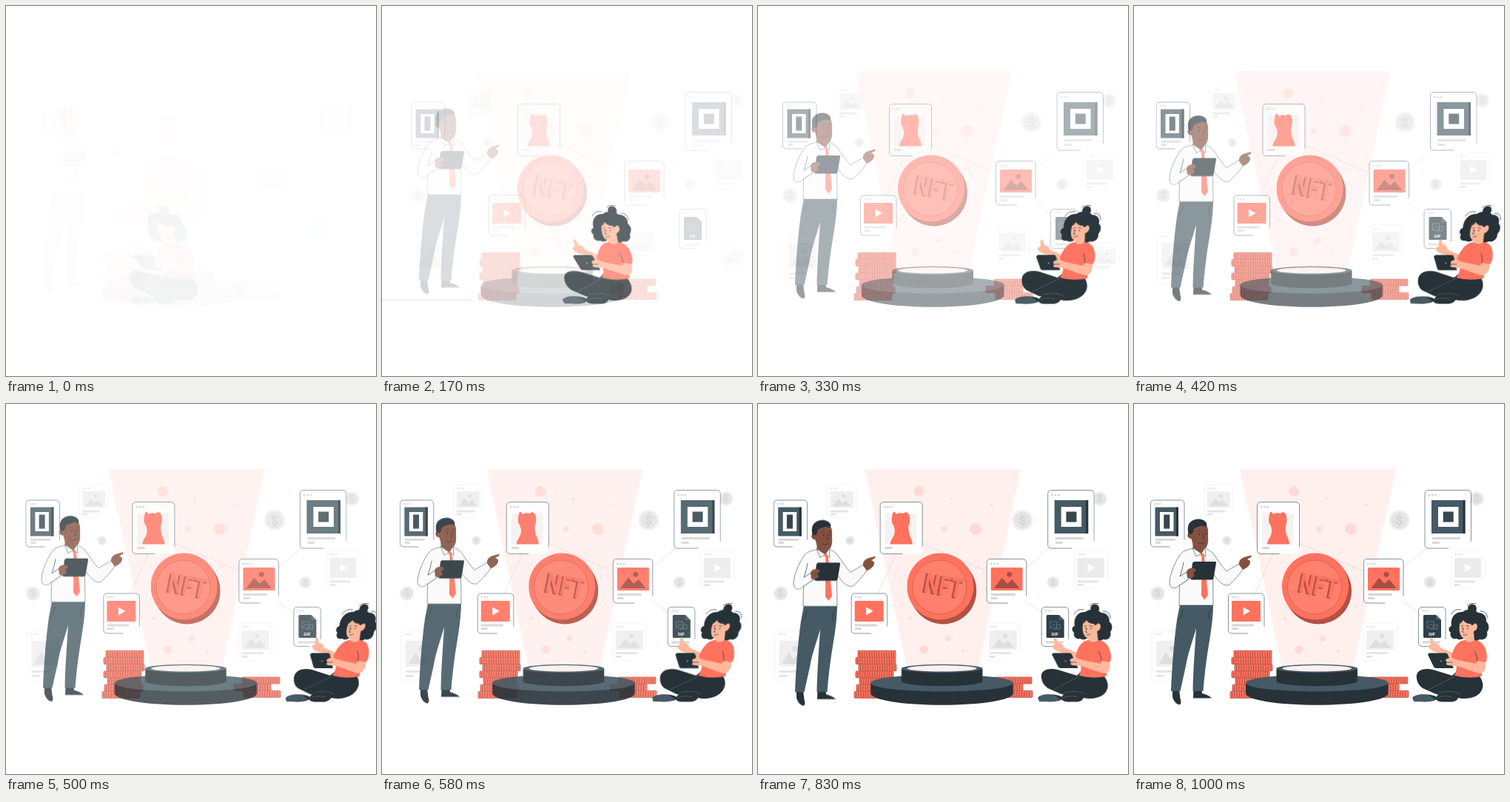
An HTML page that plays this animation: 500x500 px, repeating every 1.04 s.

```html
<!DOCTYPE html>
<html lang="en">
<head>
<meta charset="utf-8">
<title>Token gallery</title>
<style>
  html, body { margin: 0; width: 100%; height: 100%; overflow: hidden; background: #fff; }
  svg { display: block; width: 100vw; height: 100vh; }
  :root { --t: 40ms; --spring: cubic-bezier(.36, -.01, .5, 1.38); }

  /* Every animation is paused and scrubbed through --t. */
  .left, .right, .down, .speed, .fade, .floor {
    animation-duration: 1s;
    animation-fill-mode: both;
    animation-play-state: paused;
    animation-delay: calc(var(--t) * -1);
    animation-timing-function: linear;
  }
  .fade { animation-name: fade; }
  .left, .right, .down { animation-timing-function: var(--spring), linear; }
  .left { animation-name: fromLeft, fade; }
  .right { animation-name: fromRight, fade; }
  .down { animation-name: fromTop, fade; }
  .speed {
    transform-origin: 250px 335px;
    animation-name: speedIn, appear;
    animation-timing-function: var(--spring), linear;
  }
  .floor { animation-name: floor; }

  @keyframes fromLeft { from { transform: translateX(-20px); } to { transform: none; } }
  @keyframes fromRight { from { transform: translateX(20px); } to { transform: none; } }
  @keyframes fromTop { from { transform: translateY(-20px); } to { transform: none; } }
  @keyframes fade {
    0% { opacity: 0; } 4% { opacity: .015; } 20% { opacity: .2; }
    36% { opacity: .47; } 52% { opacity: .79; } 68%, 100% { opacity: 1; }
  }
  @keyframes speedIn {
    0% { transform: translateX(-229px) skewX(17deg); }
    60% { transform: translateX(0) skewX(-10deg); }
    80% { transform: translateX(0) skewX(2deg); }
    100% { transform: translateX(0) skewX(0deg); }
  }
  @keyframes appear {
    0% { opacity: 0; } 4% { opacity: .05; } 20% { opacity: .75; }
    36% { opacity: .98; } 44%, 100% { opacity: 1; }
  }
  @keyframes floor { 0%, 12% { opacity: 0; } 20% { opacity: 1; } 28%, 100% { opacity: 0; } }

  .red { fill: #ff725e; }
  .rust { fill: #b35042; }
  .ink { fill: #263238; }
  .slate { fill: #455a64; }
  .brown { fill: #85513f; }
  .skin { fill: #ffb89c; }
  .shirt { fill: #fafafa; stroke: #37474f; stroke-width: .6; stroke-linejoin: round; }
  .thin { fill: none; stroke: #263238; stroke-width: .7; stroke-linecap: round; }
  .wire { fill: none; stroke: #d8d8d8; stroke-width: .7; }
  text { font-family: Roboto, "Liberation Sans", sans-serif; font-weight: 700; }
</style>
</head>
<body>
<svg id="stage" viewBox="0 0 500 500" xmlns="http://www.w3.org/2000/svg"></svg>
<script>
const rect = (x, y, w, h, fill, r = 0) =>
  `<rect x="${x}" y="${y}" width="${w}" height="${h}" rx="${r}" fill="${fill}"/>`;
const dot = (x, y, r, fill) => `<circle cx="${x}" cy="${y}" r="${r}" fill="${fill}"/>`;
const path = (cls, d) => `<path class="${cls}" d="${d}"/>`;
const oval = (cls, x, y, rx, ry) => `<ellipse class="${cls}" cx="${x}" cy="${y}" rx="${rx}" ry="${ry}"/>`;

// A window: frame with a gap in its lower edge, three dots, and caption bars.
function card(x, y, w, h, art, bars, dark = true) {
  const line = dark ? '#455a64' : '#ededed', grey = dark ? '#d6d6d6' : '#e4e4e4';
  const step = w > 52 ? 4.4 : 3.5, r = w > 52 ? 1.6 : 1.3, top = y + (w > 52 ? 6.5 : 5);
  const bar = ([bx, by, bw]) => rect(bx, by - 1.4, bw, 2.8, grey, .6);
  return `<rect x="${x}" y="${y}" width="${w}" height="${h}" rx="4.5" fill="#fff" stroke="${line}"
      stroke-width=".65" stroke-dasharray="${w + h - 16} ${w * .6} 999"/>` +
    [0, 1, 2].map(i => dot(x + 5.8 + i * step, top, r, grey)).join('') +
    art + bars.map(bar).join('');
}

function picture(x, y, w, h, back, front) {
  return rect(x, y, w, h, back, 1.5) + dot(x + w * .58, y + h * .3, h * .11, front) +
    `<path fill="${front}" d="M${x + w * .1} ${y + h * .9}l${w * .25} ${-h * .46}l${w * .17} ${h * .26}
      l${w * .15} ${-h * .18}l${w * .23} ${h * .38}z"/>`;
}

function video(x, y, w, h, back, front) {
  const cx = x + w / 2, cy = y + h / 2;
  return rect(x, y, w, h, back, 1.5) +
    `<path fill="${front}" d="M${cx - 4} ${cy - 5.5}l9.5 5.5l-9.5 5.5z"/>`;
}

function squares(x, y, w, h, edge, cw, ch) {
  return rect(x, y, w, h, '#455a64') + rect(x + w - 3, y, 3, h, '#263238') +
    rect(x + edge, y + edge, w - 2 * edge, h - 2 * edge, '#fff') +
    rect(x + (w - cw) / 2, y + (h - ch) / 2, cw, ch, '#37474f');
}

const greyCoin = (x, y, r) => dot(x, y, r, '#f0f0f0') + dot(x, y, r * .8, '#e4e4e4') +
  `<text x="${x}" y="${y + r * .42}" font-size="${r * 1.2}" text-anchor="middle" fill="#d2d2d2">$</text>`;

// Coins seen from the side, with ribs.
const pile = (rows) => rows.map(([x, y, w]) =>
  `<rect x="${x}" y="${y}" width="${w}" height="9" rx="1" class="red" stroke="#a84a3e" stroke-width=".7"/>
   <path d="M${x + 2} ${y + 4.8}h${w - 4}" stroke="#a84a3e" stroke-width="6.8" stroke-dasharray=".9 2.4"/>`
).join('');

const backdrop = `<g class="right">
  ${card(95, 109, 39, 44, picture(99, 118, 31, 22, '#efefef', '#dedede'), [[99, 145, 24], [99, 149.2, 7]], false)}
  ${card(24, 306, 48, 69, picture(30, 320, 37, 35, '#efefef', '#dedede'), [[30, 361.5, 24], [30, 367.5, 11]], false)}
  ${card(429, 198, 45, 51, video(433, 208, 36, 27, '#ebebeb', '#fff'), [[433, 240, 28], [433, 244.5, 8]], false)}
  ${card(310, 296, 45, 51, picture(314, 306, 37, 26, '#efefef', '#dedede'), [[314, 336.7, 29], [314, 341.5, 8]], false)}
  ${card(440, 321, 37, 39, picture(443, 329, 30, 20, '#efefef', '#dedede'), [[443, 353, 22]], false)}
  ${greyCoin(358.5, 157, 14)}${greyCoin(400, 241, 8.5)}${greyCoin(125.5, 184.5, 6.5)}
  ${greyCoin(32, 256, 10)}${greyCoin(463, 128, 10)}
</g>`;

const bubbles = [[216, 118, 7], [260, 128, 1.7], [314, 136, 1.7], [250, 169, 3.5], [293, 169, 8],
  [296, 220, 1.7], [204, 290, 2], [223, 332, 5.5], [255, 317, 3.5], [276, 334, 1.7]];
const beam = `<g class="left">
  <path fill="#fff0ee" d="M143 88H354L296 357H200z"/>
  ${bubbles.map(b => dot(...b, '#ffdad4')).join('')}
</g>`;

const ape = path('red', `M180 189.500C180 184 184 181 185.500 176C187 171 186 167 184 163C181 160 182 152 184 146
  C186 145 187 147 188 149C191 147 195 147 198 148C200 145 204 146 205 149C207 153 206.500 157 206 161
  C205 164 204 166 205 171C205 178 209.500 181 210 189.500z`);
const gif = `<path fill="#2f4048" d="M392.500 285H408L415 292V314.500Q415 316 413.500 316H392.500Q391 316 391 314.500V286.500
    Q391 285 392.500 285z"/><path class="slate" d="M408 285V292H415z"/>
  <path d="M396 294h9v9h-9zM397 302l4-5l6 6M405 298h5v6h-9" fill="none" stroke="#78909c" stroke-width=".6"/>
  <text x="402.500" y="313" font-size="6" text-anchor="middle" fill="#fff">GIF</text>`;
const gallery = `<g class="right">
  <path class="wire" d="M188 202L163 257M223 188L311 226M363 222L397 193M360 264L387 284"/>
  ${card(22.5, 130, 45.500, 63, squares(28.500, 139.500, 31.500, 39, 6.500, 8, 19), [[29, 183.3, 27], [29, 187.5, 7]])}
  ${card(166.500, 132.500, 57, 70, rect(173, 148, 42.500, 41.500, '#f4f2f2', 1.5) + ape, [[173, 194.500, 10]])}
  ${card(127.500, 256, 48.500, 54, video(132, 266, 39, 28, '#ff725e', '#fff'), [[132, 299, 30], [132, 303.7, 9]])}
  ${card(310.500, 209.500, 53.500, 59.500, picture(316, 221, 43, 31, '#ff725e', '#a84e42'), [[316, 257.500, 33], [316, 262.500, 9]])}
  ${card(393, 116.500, 62.500, 78.500, squares(402, 130, 45.500, 45, 9, 14, 14), [[403, 181.500, 38], [403, 187.500, 10]])}
  ${card(384.500, 274.500, 36.500, 53, gif, [[390, 322, 24]])}
</g>`;

const piles = `<g class="fade">
  ${pile([[130, 388.500, 51], [133, 379.300, 52], [137, 370.100, 45], [132, 360.900, 51],
    [136, 351.700, 51], [132, 342.500, 54], [135, 333.300, 51]])}
  ${pile([[321, 387.500, 50], [308, 378.300, 50], [319, 369.100, 51]])}
</g>`;

const podium = `<g class="left">
  ${path('ink', 'M151 377V391A96.250 15.800 0 0 0 343.500 391V377z')}
  ${oval('slate', 247.25, 377, 96.25, 11.5)}
  ${path('ink', 'M192.500 358V375A55 7 0 0 0 302 375V358z')}
  ${oval('slate', 247.25, 357.500, 54.75, 5.7)}
  <ellipse cx="247.25" cy="357.300" rx="47" ry="4.200" fill="#fff0ee"/>
</g>`;

const letters = (dx, dy, fill) => `<text font-size="36" fill="${fill}"
  transform="matrix(.76 .15 -.2 1 ${221.500 + dx} ${253 + dy})">NFT</text>`;
const coin = `<g class="left">
  ${oval('rust', 249, 252.500, 45, 45)}${oval('rust', 247, 249.500, 45, 45)}
  ${oval('red', 245, 246.500, 45, 45)}
  <circle cx="244" cy="247.500" r="36.500" fill="#ff806d" stroke="#d65c4b" stroke-width=".8"/>
  ${letters(-2.6, 1.2, '#b35042')}${letters(-1.3, .6, '#b35042')}${letters(0, 0, '#ff725e')}
</g>`;

const man = `<g class="down">
  ${path('ink', 'M52 386L61 386L62.500 398Q65 405 61 406.500Q55 405 52 396z')}
  ${path('ink', 'M80.500 386H91.500L92 391Q101 393 105 397.500H80z')}
  ${path('slate', `M62 271H107C107 288 104 308 101 326C97 350 95 370 93.500 388H79.500C80 360 82 334 84 303
    C80 318 73 336 70 354L62.500 388H50C51 360 54 320 58 292z`)}
  ${path('thin', 'M66 278Q65 288 60 292M104 277Q99 284 102 291')}
  ${path('shirt', `M80 195C72 197 66 198 62 204C54 216 48 232 48 242C49 251 57 250 61.500 245L61 272H107
    L106.500 228C113 239 120 246 128 245C136 238 142 231 147.500 223L142 216L125 226C118 219 113 210 107 202
    C104 198 99 197 96 194z`)}
  ${path('thin', 'M61.500 245L78 234M71 227L62 233Q66 222 67 214M106.500 228Q108 220 105 214')}
  ${path('brown', 'M79 186L80 197L91 202L96 196L95 188z')}
  ${path('brown', `M75 170C75 162 82 159 92 160C99 161 101 169 100 178C101 188 99 197 91 196.500
    C84 196 79 190 77.500 182C71 182 71 174 75 174z`)}
  ${path('ink', `M76 182C72 174 71 163 77 159C82 154 94 154 98 161Q99 165 97 166C92 162 85 167 81 168
    Q80 174 78 176Q74 174 74 178z`)}
  ${path('thin', 'M86 172Q88 170 90 172M95 171Q97 170 98 171M93 175L95 181L92 182M87 188Q91 190 95 187')}
  ${dot(88.500, 176, .9, '#263238')}${dot(96.500, 175, .9, '#263238')}
  ${path('shirt', 'M79 194L91 202L84 206zM96 194L91 202L97 206z')}
  ${path('red', 'M89 202L94 201.500L95 207L100 258L95.500 264.500L91 259L91.500 207z')}
  ${path('brown', `M142 217C141 211 146 208 149 207L158 204.500Q160 206 157 207.500L153 210Q158 211 157 215
    Q155 221 147 224z`)}
  ${path('ink', 'M81 213H109.500Q111.500 213 111 215L107.500 235.500Q107 237.500 105 237.500H78.500Q76 237.500 76.500 235L79 215z')}
  ${path('brown', 'M71 227C72 222 77 221 82 222L84 225L80 228L82 232Q78 237 72 235z')}
</g>`;

const woman = `<g class="speed">
  ${dot(457, 276.500, 6, '#263238')}
  ${path('ink', `M429 300C427 289 434 280 444 281C450 276 461 277 465 282C473 282 477 288 476 294
    C481 298 480 305 477 308C479 315 473 320 467 318C460 323 451 320 447 315C444 319 438 319 436 317
    C430 319 426 313 428 309C424 306 425 301 429 300z`)}
  ${path('thin', 'M429 284Q433 276 442 278M450 272Q455 268 462 270M468 280Q476 279 478 289')}
  ${path('skin', 'M446 308L447 322Q454 327 460 320L459 306z')}
  ${path('skin', `M441 294C445 289 455 290 458 297Q464 295 464 301Q463 307 458 307C457 314 450 318 445 316
    C440 314 438 303 441 294z`)}
  ${path('ink', 'M440 297C442 287 456 287 460 297Q456 301 455 297Q448 297 445 292Q443 296 440 297z')}
  ${path('thin', 'M442 300.500L445 299.500M449 299.500L453 300.500M445.500 303L443.500 308L446 308.500M445 312Q448 313 450 311')}
  ${dot(444, 303, .8, '#263238')}${dot(451, 303.500, .8, '#263238')}
  ${oval('ink', 393, 397.500, 16.500, 5)}
  ${path('slate', 'M377 399C378 392 388 392 398 393L407 399Q400 403 378 402z')}
  ${path('ink', `M382 371C380 360 391 356 404 359L430 367L437 360C456 356 471 366 471.500 380
    C471 394 456 399 443 398C430 396 418 394 408 392L390 384Q383 379 382 371z`)}
  ${path('ink', 'M408 398C409 391 418 388 428 390L438 394Q439 401 430 402.500H416Q409 402 408 398z')}
  <path d="M398 386Q420 375 433 368M412 390Q432 386 441 392M410 397Q420 393 430 396" fill="none"
    stroke="#56686f" stroke-width=".7"/>
  ${path('skin', `M435 335L430 349L412 336C405 335 399 332 397 327L401 325L400 317Q402 313.500 403.500 317L406 323
    Q412 323 414 329L433 337z`)}
  ${path('red', `M447 319C438 320 432 328 429 341L434 348Q438 357 433 367Q452 372 470 368L470 352
    Q477 350 477 342C476 328 471 320 460 319Q454 325 447 319z`)}
  ${path('ink', 'M399 336.500H421Q423 336.500 424 338.500L432 357H408Q406 357 405 355L397 338.500z')}
  ${dot(415, 347.500, 1, '#90a4ae')}
  ${path('skin', `M464 347L475 349C476 358 474 364 466 364C456 361 445 357 436 354L424 353
    Q420 351 423 350L421 346Q423 343 429 343L438 346L462 351z`)}
  ${path('thin', 'M464 347Q463 338 460 334M423 349L430 349')}
</g>`;

document.getElementById('stage').innerHTML = backdrop + beam + gallery + piles + podium + coin + man +
  '<path class="floor" d="M0 397.500H122" stroke="#dcdcdc" stroke-width=".8"/>' + woman;

const LOOP = 1040, FRAMES = 25;
function tick() {
  const now = performance.now() % LOOP;
  const step = Math.min(FRAMES, Math.floor((now + 3) / (LOOP / FRAMES)) + 1);
  document.documentElement.style.setProperty('--t', step * 40 + 'ms');
  requestAnimationFrame(tick);
}
tick();
</script>
</body>
</html>
```
